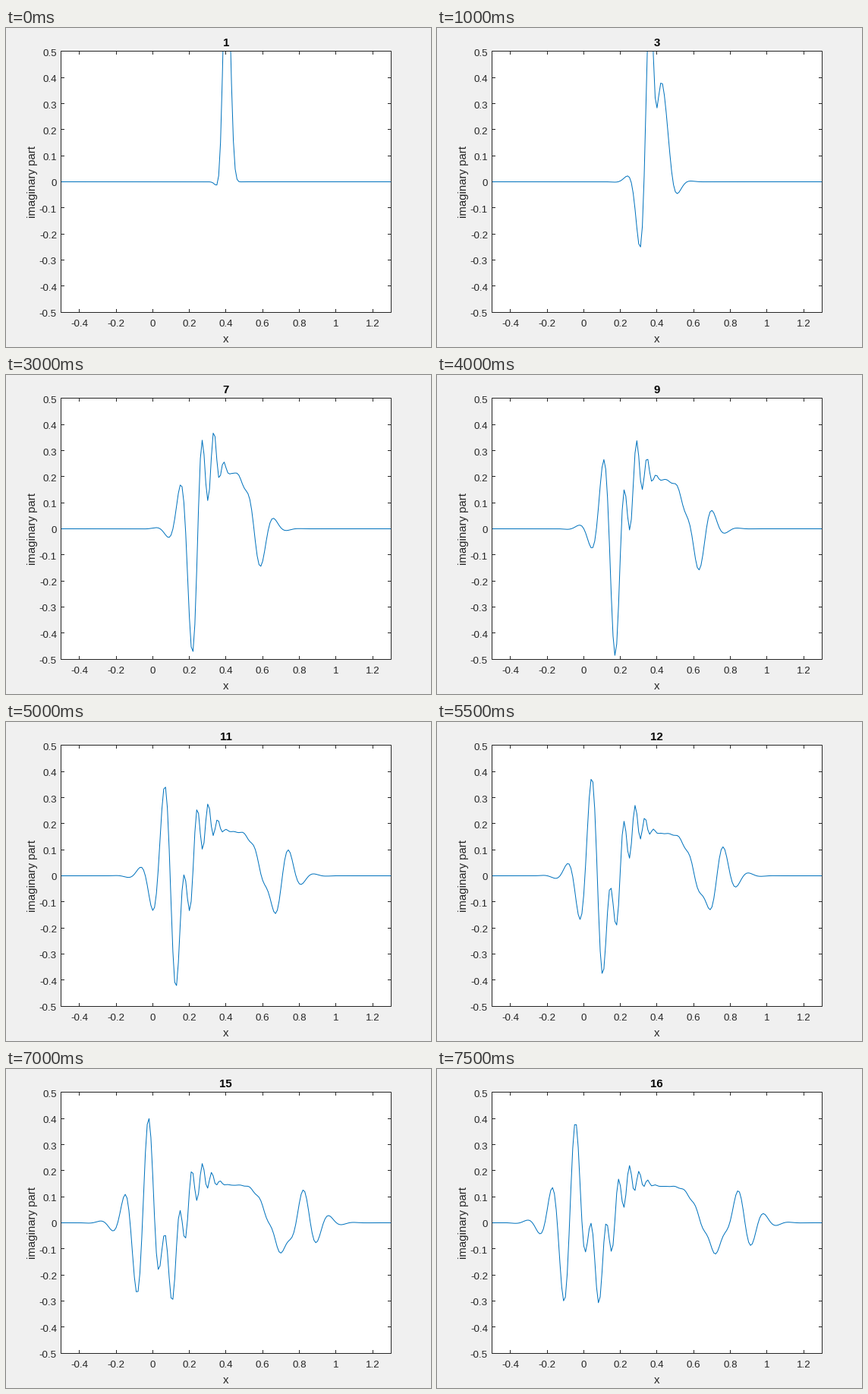
Recreate the animation shown at these times as a matplotlib script. Size 560 px wide and 420 px high, loop 8000 ms.

```python
import numpy as np
import matplotlib.pyplot as plt
from matplotlib.animation import FuncAnimation
from matplotlib.patches import Rectangle

W, H, DPI = 560, 420, 80
PT = 72 / DPI                                   # points per pixel
STEPS, INTERVAL = 16, 500
INK, BLUE = "#262626", "#0072bd"

# Plot area in pixels: the drawn frame, and the span of the data inside it
FRAME_L, FRAME_R, FRAME_T, FRAME_B = 72.5, 507.5, 30.5, 374.5
LEFT, RIGHT, TOP, BOTTOM = 72.6, 507.2, 31, 374
XMIN, XMAX, YMIN, YMAX = -0.5, 1.3, -0.5, 0.5
TICK = 4.5

plt.rcParams["font.family"] = "Liberation Sans"

# Free Gaussian wave packet, Crank-Nicolson in time on a periodic grid
DX, DT, N = 0.01, 0.001, 400
K0, X0 = 26.5, 0.4
x = np.round(-1 + DX * np.arange(N), 2)
psi0 = np.exp(-1000 * (x - X0) ** 2 - 1j * K0 * x)
k = 2 * np.pi * np.fft.fftfreq(N, DX)
energy = (1 - np.cos(k * DX)) / DX ** 2
half = 0.5j * DT * energy
growth = (1 - half) / (1 + half)
spectrum = np.fft.fft(psi0)
shown = (x >= XMIN - DX / 2) & (x <= XMAX + DX / 2)


def wave(n):
    return np.fft.ifft(spectrum * growth ** n).imag[shown]


def to_px(v):
    return LEFT + (v - XMIN) / (XMAX - XMIN) * (RIGHT - LEFT)


def to_py(v):
    return BOTTOM - (v - YMIN) / (YMAX - YMIN) * (BOTTOM - TOP)


# One axes over the whole figure, in pixels with y pointing down
fig = plt.figure(figsize=(W / DPI, H / DPI), dpi=DPI, facecolor="#f0f0f0")
ax = fig.add_axes([0, 0, 1, 1])
ax.set_xlim(0, W)
ax.set_ylim(H, 0)
ax.axis("off")


def box(**kw):
    return ax.add_patch(Rectangle((FRAME_L, FRAME_T), FRAME_R - FRAME_L,
                                  FRAME_B - FRAME_T, snap=False, **kw))


def stroke(xs, ys, color=INK, **kw):
    return ax.plot(xs, ys, color=color, lw=PT, snap=False,
                   solid_capstyle="butt", **kw)[0]


def label(px, py, text, size=13.33, ha="center", color=INK, **kw):
    return ax.text(px, py, text, fontsize=size * PT, ha=ha, va="baseline",
                   color=color, **kw)


area = box(facecolor="white", edgecolor="none", zorder=0)
box(fill=False, edgecolor=INK, linewidth=PT, zorder=1)

for v in np.round(np.arange(-2, 7) * 0.2, 1):
    px = to_px(v)
    col = np.floor(px) + 0.5
    stroke([col, col], [FRAME_T, FRAME_T + TICK])
    stroke([col, col], [FRAME_B - TICK, FRAME_B])
    label(px, 393, f"{v:g}")

for v in np.round(np.arange(-5, 6) * 0.1, 1):
    py = to_py(v)
    if YMIN < v < YMAX:
        row = np.floor(py) + 0.5
        stroke([FRAME_L, FRAME_L + TICK], [row, row])
        stroke([FRAME_R - TICK, FRAME_R], [row, row])
    label(67, py + 5.9, f"{v:g}", ha="right")

label(289.8, 414, "x", 15)
label(38.5, 202, "imaginary part", 15, rotation=90, rotation_mode="anchor")
title = label(289.8, 24, "1", 15, color="black", weight="bold")

line = stroke(to_px(x[shown]), to_py(wave(0)), BLUE, zorder=3)
line.set_clip_path(area)


def update(i):
    line.set_ydata(to_py(wave(i)))
    title.set_text(str(i + 1))
    return line, title


anim = FuncAnimation(fig, update, frames=STEPS, interval=INTERVAL,
                     repeat=True, repeat_delay=0, blit=False)
plt.show()
```
